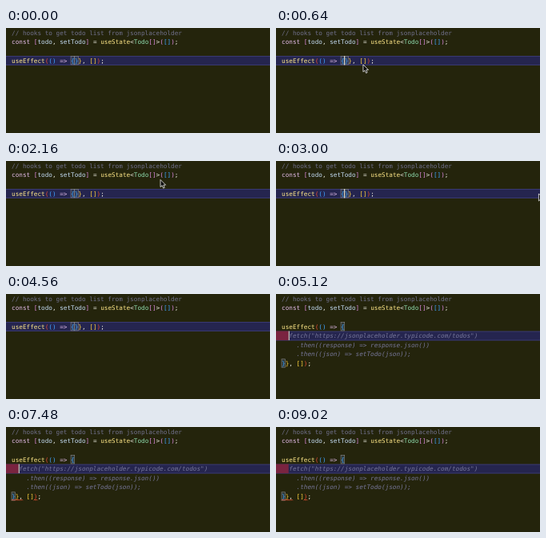
Write an HTML page that moves like this. It is 330 px wide and 132 px high and loops after 9060 ms.

```html
<!DOCTYPE html>
<html lang="en">
<head>
<meta charset="utf-8">
<title>Editor completion</title>
<style>
html, body { margin: 0; width: 100%; height: 100%; overflow: hidden; background: #24240c; }
svg { display: block; width: 100vw; height: 100vh; }
text { font: 7.69px "DejaVu Sans Mono", monospace; white-space: pre; text-rendering: geometricPrecision; }
.ghost { font-style: italic; fill: #77779a; }
.comment { fill: #70708c; }
.keyword { fill: #e4bcea; }
.name { fill: #c4dcf4; }
.call { fill: #ffe888; }
.type { fill: #8fdcae; }
.plain { fill: #f0f0e4; }
.gold { fill: #ffd23c; }
.violet { fill: #dc8ade; }
.blue { fill: #3fa4ff; }
.red { fill: #e04a34; }
.box { fill: #3a4a5c; fill-opacity: .5; stroke: #8b8b8b; stroke-width: .6; }
.wave { fill: none; stroke: #e85034; stroke-width: .9; }
</style>
</head>
<body>
<svg id="stage" viewBox="0 0 330 132">
  <rect width="330" height="132" fill="#24240c"/>
  <rect id="row" x="-1" y=".5" width="332" height="11" fill="#25254f" stroke="#3a3a74"/>
  <g id="boxes"></g>
  <g id="code"></g>
  <rect id="caret" width="1" height="11.5" fill="#f0ecd4"/>
  <path id="mouse" d="M0 0V9.2L2.1 7.3L3.6 10.7L5.2 10L3.8 6.7H6.6Z" fill="#0c0c0c" stroke="#f2f2f2" stroke-width=".8"/>
</svg>
<script>
const NS = "http://www.w3.org/2000/svg";
const LOOP = 9060, LEFT = 7, CHAR = 4.63, ROW = 11.55, TOP = 0.4;
const ENTER = 4940, SUGGEST = 5100, ERRORS = 5520;
const $ = id => document.getElementById(id);
const colX = col => LEFT + col * CHAR;
const rowY = row => TOP + row * ROW;

function add(parent, tag, attrs) {
  const el = document.createElementNS(NS, tag);
  for (const key in attrs) el.setAttribute(key, attrs[key]);
  return parent.appendChild(el);
}

// Tokens are written as "class:text", separated by "|".
function line(parent, row, col, tokens) {
  const text = add(parent, "text", { x: colX(col), y: rowY(row) + 8.5 });
  for (const token of tokens.split("|")) {
    const cut = token.indexOf(":");
    add(text, "tspan", { class: token.slice(0, cut) }).textContent = token.slice(cut + 1);
  }
  return text;
}

function box(parent, row, col) {
  return add(parent, "rect", {
    class: "box", x: colX(col), y: rowY(row) + 0.6, width: CHAR, height: ROW - 1.2
  });
}

function wave(parent, row, col, count) {
  let d = `M${colX(col)} ${rowY(row) + 11}`;
  for (let i = 0; i < count * 2; i++) d += "l1.16 -1.2l1.16 1.2";
  add(parent, "path", { class: "wave", d });
}

const show = (el, on) => el.setAttribute("visibility", on ? "visible" : "hidden");
const move = (el, x, y) => el.setAttribute("transform", `translate(${x} ${y})`);

const code = $("code");
const closing = "blue:}|gold:}|plain:, |gold:[]|red:)|plain:;";

line(code, 0, 0, "comment:// hooks to get todo list from jsonplaceholder");
line(code, 1, 0, "keyword:const |violet:[|name:todo|plain:, |name:setTodo|violet:]|plain: = |call:useState|plain:<|type:Todo|violet:[]|plain:>|violet:(|blue:[]|violet:)|plain:;");
line(code, 3, 0, "call:useEffect|red:(|blue:()|keyword: => |blue:{");
box($("boxes"), 3, 16);

const inlineBox = box($("boxes"), 3, 17);
const inlineEnd = line(code, 3, 17, closing);

const tail = add(code, "g", {});
box(tail, 0, 0);
line(tail, 0, 0, closing);
const waves = add(tail, "g", {});
wave(waves, 0, 0, 3);
wave(waves, 0, 6, 1);

const indent = add($("boxes"), "rect", {
  y: rowY(4), width: colX(2) - 0.5, height: ROW, fill: "#7a2440"
});

const ghost = add(code, "g", {});
line(ghost, 4, 2, 'ghost:fetch("https://jsonplaceholder.typicode.com/todos")');
line(ghost, 5, 4, "ghost:.then((response) => response.json())");
line(ghost, 6, 4, "ghost:.then((json) => setTodo(json));");

// Pointer stops: time, x, y
const path = [
  [20, 204, 66], [250, 165, 60], [640, 109, 46], [920, 91, 42],
  [1300, 89, 42], [1460, 89, 42], [1580, 88, 41], [1900, 88, 41],
  [2080, 150, 27], [2240, 235, 20], [2420, 328.4, 41], [4560, 328.4, 41]
];

function pointer(t) {
  const i = path.findIndex(stop => t < stop[0]);
  if (i < 1) return null;
  const [t0, x0, y0] = path[i - 1], [t1, x1, y1] = path[i];
  const k = (t - t0) / (t1 - t0);
  return [x0 + (x1 - x0) * k, y0 + (y1 - y0) * k];
}

// Caret spans: appears, starts to fade, is gone
const blinks = [[320, 1020, 1300], [2840, 3700, 3720], [ENTER, 5520, 6060], [7480, 8440, 8860]];

function caretAlpha(t) {
  const span = blinks.find(([on, , off]) => t >= on && t < off);
  return span ? Math.min(1, (span[2] - t) / (span[2] - span[1])) : 0;
}

function draw(t) {
  const split = t >= ENTER, suggested = t >= SUGGEST;
  const row = split ? 4 : 3;
  move($("row"), 0, rowY(row));
  show(inlineEnd, !split);
  show(inlineBox, !split);
  show(tail, split);
  show(indent, split);
  show(ghost, suggested);
  show(waves, t >= ERRORS);
  move(tail, 0, (suggested ? 7 : 5) * ROW);

  move($("caret"), colX(split ? 2 : 17) - 0.5, rowY(row));
  $("caret").setAttribute("opacity", caretAlpha(t));

  const at = pointer(t);
  show($("mouse"), at);
  if (at) move($("mouse"), ...at);
}

const start = performance.now();
function tick() {
  draw((performance.now() - start) % LOOP);
  requestAnimationFrame(tick);
}
tick();
</script>
</body>
</html>
```
